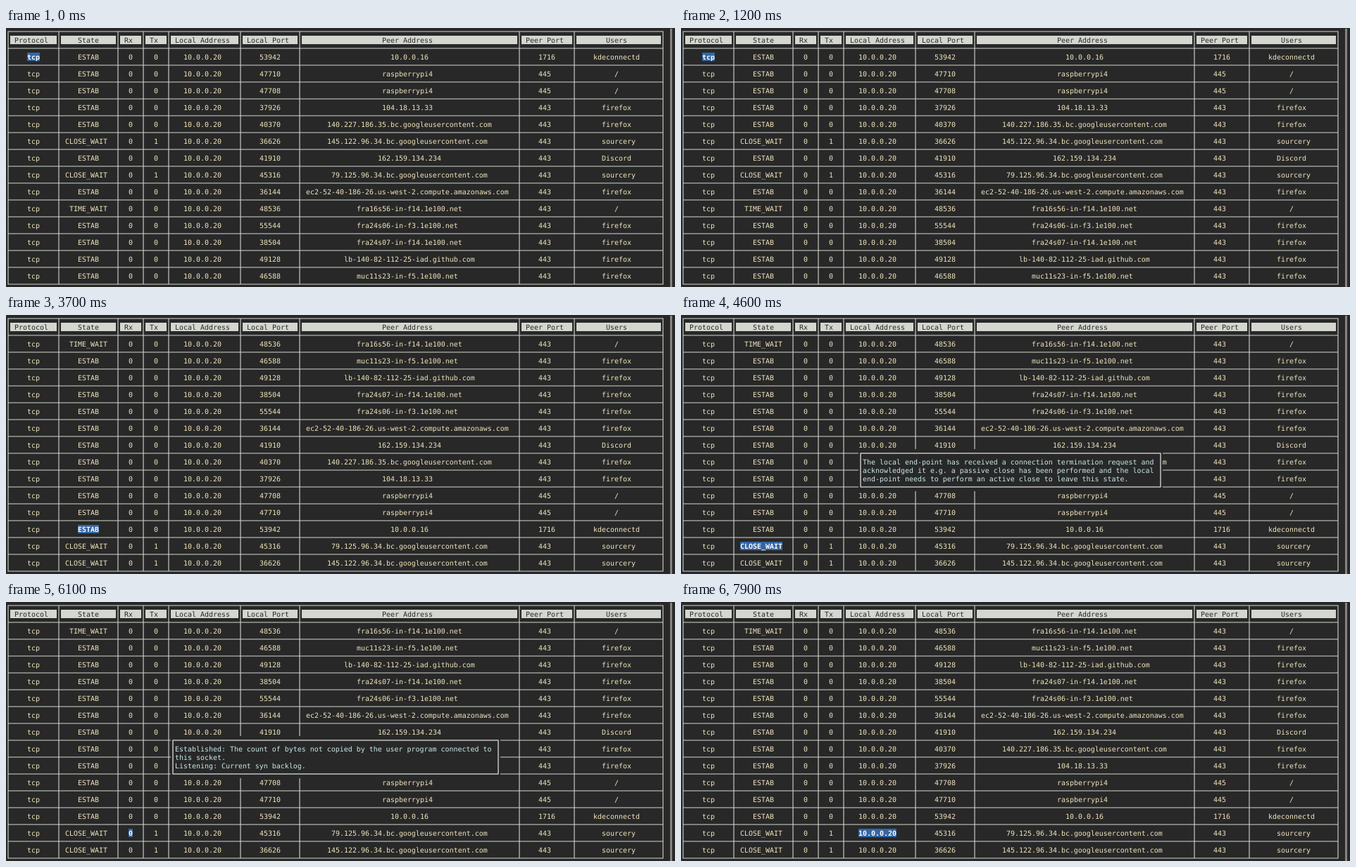
An HTML page that plays this animation: 950 by 369 pixels, repeating every 8000 ms.

```html
<!DOCTYPE html>
<html lang="en">
<head>
<meta charset="utf-8">
<title>Socket table</title>
<style>
html, body { margin: 0; width: 100%; height: 100%; overflow: hidden; background: #282828; }
svg { display: block; }
text { font: 9.967px "DejaVu Sans Mono", monospace; text-rendering: geometricPrecision; white-space: pre; }
.cell { fill: #f0e5bd; }
.head { fill: #282828; }
.hot { fill: #ffffff; font-weight: bold; }
.tip { fill: #c9e8e8; }
</style>
</head>
<body>
<svg id="stage" width="950" height="369" viewBox="0 0 950 369"></svg>
<script>
const CW = 6, RH = 12, LOOP = 8000;
const LINE = '#d3d7cf', BG = '#282828', BLUE = '#3465a4';
const edges = [3, 75, 159, 195, 231, 333, 417, 729, 807, 933];
const titles = ['Protocol', 'State', 'Rx', 'Tx', 'Local Address', 'Local Port', 'Peer Address', 'Peer Port', 'Users'];

// state, tx, local port, peer, peer port, user
const rows = `ESTAB 0 53942 10.0.0.16 1716 kdeconnectd
ESTAB 0 47710 raspberrypi4 445 /
ESTAB 0 47708 raspberrypi4 445 /
ESTAB 0 37926 104.18.13.33 443 firefox
ESTAB 0 40370 140.227.186.35.bc.googleusercontent.com 443 firefox
CLOSE_WAIT 1 36626 145.122.96.34.bc.googleusercontent.com 443 sourcery
ESTAB 0 41910 162.159.134.234 443 Discord
CLOSE_WAIT 1 45316 79.125.96.34.bc.googleusercontent.com 443 sourcery
ESTAB 0 36144 ec2-52-40-186-26.us-west-2.compute.amazonaws.com 443 firefox
TIME_WAIT 0 48536 fra16s56-in-f14.1e100.net 443 /
ESTAB 0 55544 fra24s06-in-f3.1e100.net 443 firefox
ESTAB 0 38504 fra24s07-in-f14.1e100.net 443 firefox
ESTAB 0 49128 lb-140-82-112-25-iad.github.com 443 firefox
ESTAB 0 46588 muc11s23-in-f5.1e100.net 443 firefox`.split('\n').map(s => {
  const [state, tx, port, ...peer] = s.split(' ');
  return ['tcp', state, '0', tx, '10.0.0.20', port, ...peer];
});
const byState = [...rows].sort((a, b) => (a[1] > b[1]) - (a[1] < b[1])).reverse();

const tips = {
  tcp: ['This is an implementation of the TCP protocol defined in RFC 793, RFC 1122',
    'and RFC 2001 with the NewReno and SACK extensions. It provides a reliable,',
    'stream-oriented, full-duplex connection between two sockets on top of ip,',
    'for both v4 and v6 versions. TCP guarantees that the data arrives in order',
    'and retransmits lost packets.'],
  estab: ['The third step of the three-way connection handshake was performed. The',
    'connection is open.'],
  close: ['The local end-point has received a connection termination request and',
    'acknowledged it e.g. a passive close has been performed and the local',
    'end-point needs to perform an active close to leave this state.'],
  rx: ['Established: The count of bytes not copied by the user program connected to',
    'this socket.',
    'Listening: Current syn backlog.']
};

// start time, row order, selected row, selected column, tooltip
const steps = [
  [0, rows, 0, 0], [300, rows, 0, 0, 'tcp'], [1200, rows, 0, 0],
  [1800, rows, 0, 1],
  [2200, byState, 11, 1], [3000, byState, 11, 1, 'estab'], [3700, byState, 11, 1],
  [4100, byState, 12, 1], [4600, byState, 12, 1, 'close'], [5400, byState, 12, 1],
  [5700, byState, 12, 2], [6100, byState, 12, 2, 'rx'], [7100, byState, 12, 2],
  [7500, byState, 12, 3], [7900, byState, 12, 4]
];

const rect = (x, y, w, h, fill, more = '') =>
  `<rect x="${x}" y="${y}" width="${w}" height="${h}" fill="${fill}" ${more}/>`;
const text = (x, top, s, cls) => `<text x="${x}" y="${top + 9.5}" class="${cls}">${s}</text>`;

function centred(col, s) {
  const room = (edges[col + 1] - edges[col]) / CW - 1;
  return edges[col] + 3 + CW * Math.floor((room - s.length) / 2);
}

function grid() {
  let d = '';
  for (const x of edges) d += `M${x} 5V365`;
  for (let y = 5; y <= 365; y += 24) d += `M3 ${y}H933`;
  const heads = titles.map((s, c) =>
    rect(edges[c] + 3, 11, edges[c + 1] - edges[c] - 6, RH, LINE) + text(centred(c, s), 11, s, 'head'));
  return `<path d="${d}" stroke="${LINE}" stroke-width="1.1" fill="none" stroke-linecap="square"/>` + heads.join('');
}

function tooltip(lines) {
  const cols = Math.max(...lines.map(s => s.length)) + 3, high = lines.length + 2;
  const x = CW * Math.floor((156 - cols) / 2), y = RH * Math.floor((37 - high) / 2) - 1;
  const w = cols * CW, h = high * RH;
  return rect(x, y, w, h, BG) +
    rect(x + 3, y + 6, w - 6, h - 12, 'none', 'stroke="#e6ecea" stroke-width="1.2"') +
    lines.map((s, i) => text(x + CW, y + RH * (i + 1), s, 'tip')).join('');
}

const base = rect(0, 0, 950, 369, BG) + rect(943, 1, 3, 368, '#86837f') + grid();

function draw([, list, row, col, tip]) {
  let out = base;
  list.forEach((cells, r) => cells.forEach((s, c) => {
    const x = centred(c, s), y = 35 + 24 * r, hot = r === row && c === col;
    if (hot) out += rect(x, y, s.length * CW, RH, BLUE);
    out += text(x, y, s, hot ? 'hot' : 'cell');
  }));
  if (tip) out += tooltip(tips[tip]);
  stage.innerHTML = out;
}

const stage = document.getElementById('stage');
let shown;
function tick() {
  const t = performance.now() % LOOP;
  const step = steps.filter(s => s[0] <= t).pop();
  if (step !== shown) draw(shown = step);
  requestAnimationFrame(tick);
}
tick();
</script>
</body>
</html>
```
